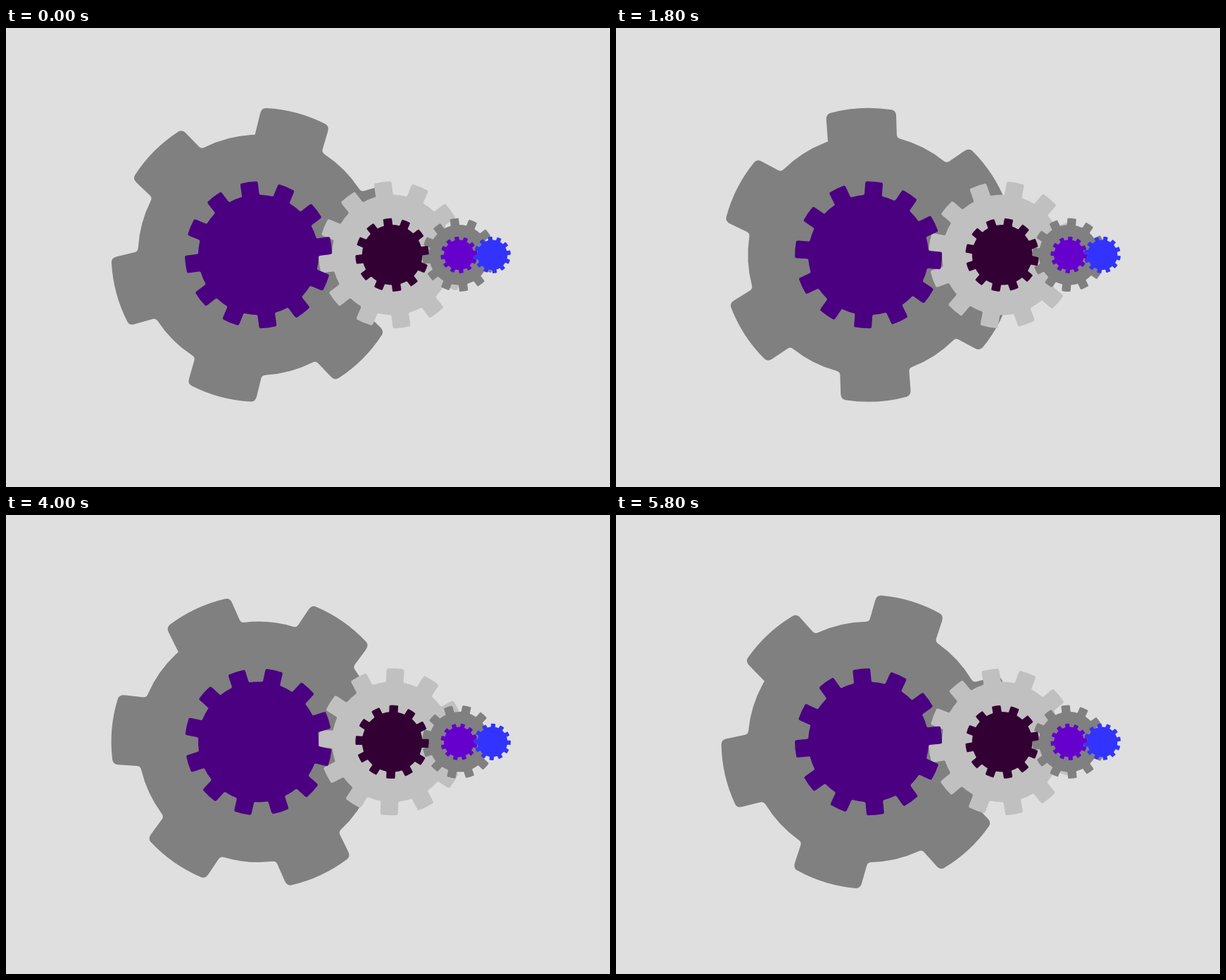
Write an HTML page with a canvas that moves like this. It is 858 px wide and 653 px high and loops after 5900 ms.

```html
<!DOCTYPE html>
<html lang="en">
<head>
<meta charset="utf-8">
<title>Gear train</title>
<style>
html, body { margin: 0; width: 100%; height: 100%; overflow: hidden; background: #dfdfdf; }
canvas { display: block; }
</style>
</head>
<body>
<canvas id="stage" width="858" height="653"></canvas>
<script>
const ctx = document.getElementById('stage').getContext('2d');
const CY = 322.8, ROOT = 0.819;
const STEP = 100, STEPS = 59;

// x, outer radius, teeth, start angle in degrees, direction, colour; back to front
const gears = [
  [358.6, 209, 6, 15, -1, '#808080'],
  [548.6, 104.5, 12, -7.5, 1, '#c0c0c0'],
  [358.6, 104.5, 12, -7.5, -1, '#4b0082'],
  [643.5, 52.25, 12, -7.5, -1, '#808080'],
  [548.6, 52.25, 12, -7.5, 1, '#330033'],
  [690.9, 26.1, 12, -7.5, 1, '#3333ff'],
  [643.5, 26.1, 12, -7.5, -1, '#6600cc']
];

const polar = (r, a) => [r * Math.sin(a), -r * Math.cos(a)];
const mix = (p, q, k) => [p[0] + (q[0] - p[0]) * k, p[1] + (q[1] - p[1]) * k];

function gearPath(outer, teeth) {
  const path = new Path2D();
  const root = outer * ROOT, pitch = 2 * Math.PI / teeth;
  const tip = 0.23 * pitch, base = 0.2775 * pitch, round = 0.03 * pitch;
  const arc = (r, from, to) => path.arc(0, 0, r, from - Math.PI / 2, to - Math.PI / 2);
  const curve = (c, p) => path.quadraticCurveTo(...c, ...p);

  for (let i = 0; i < teeth; i++) {
    const a = i * pitch;
    const [baseL, tipL, tipR, baseR] =
      [polar(root, a - base), polar(outer, a - tip), polar(outer, a + tip), polar(root, a + base)];
    // rising flank, tip, falling flank, root
    curve(baseL, mix(baseL, tipL, 0.12));
    path.lineTo(...mix(tipL, baseL, 0.2));
    curve(tipL, polar(outer, a - tip + round));
    arc(outer, a - tip + round, a + tip - round);
    curve(tipR, mix(tipR, baseR, 0.2));
    path.lineTo(...mix(baseR, tipR, 0.12));
    curve(baseR, polar(root, a + base + round));
    arc(root, a + base + round, a + pitch - base - round);
  }
  path.closePath();
  return path;
}

const paths = gears.map(([, outer, teeth]) => gearPath(outer, teeth));

function draw() {
  const turn = Math.floor(performance.now() / STEP) % STEPS;
  ctx.fillStyle = '#dfdfdf';
  ctx.fillRect(0, 0, 858, 653);
  gears.forEach(([x, , , start, dir, colour], i) => {
    ctx.save();
    ctx.translate(x, CY);
    ctx.rotate((start + dir * turn) * Math.PI / 180);
    ctx.fillStyle = colour;
    ctx.fill(paths[i]);
    ctx.restore();
  });
  requestAnimationFrame(draw);
}
draw();
</script>
</body>
</html>
```
